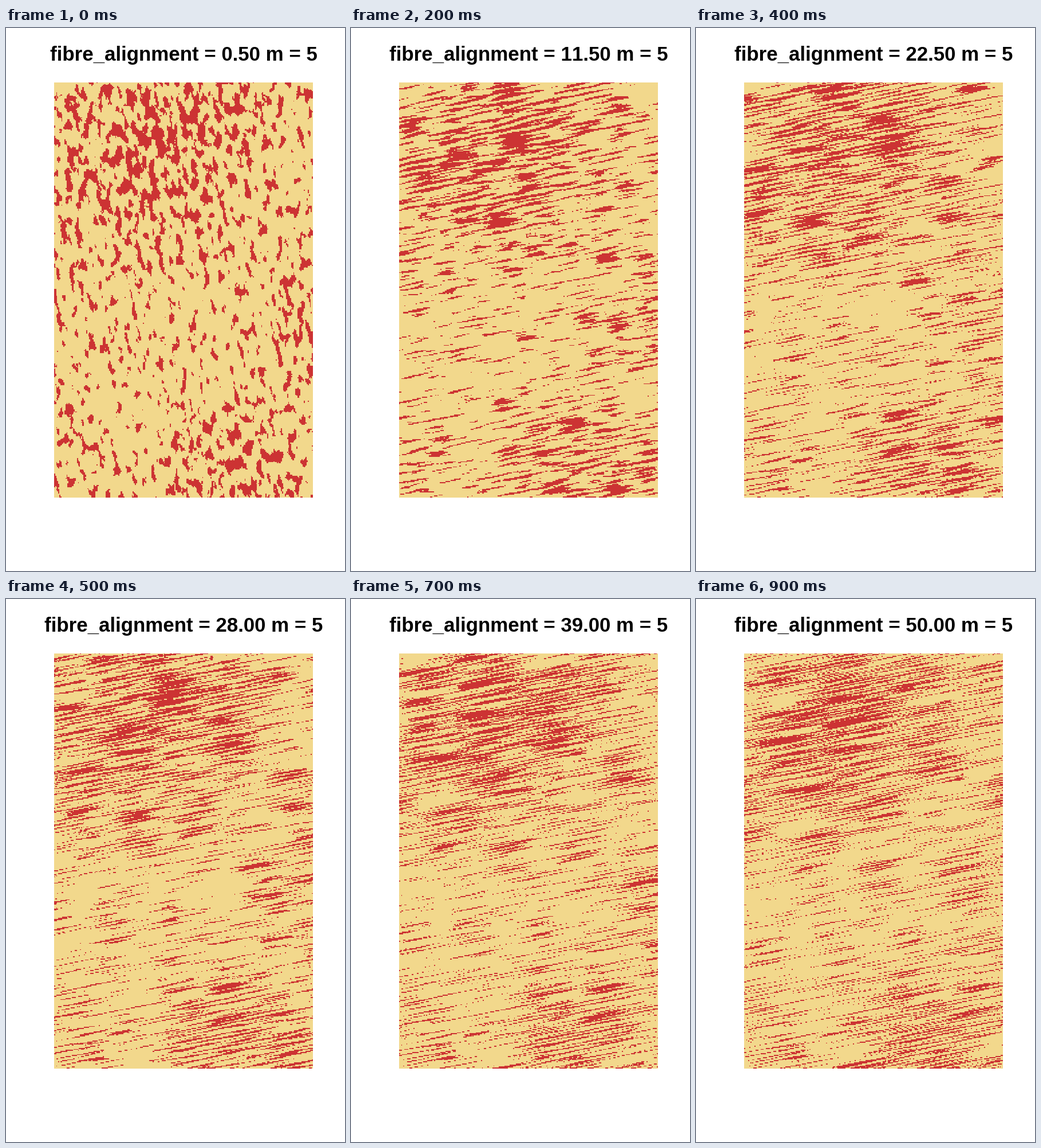
A matplotlib script for the animation above (1000 ms loop, 592x947 px).

```python
import numpy as np
import matplotlib
import matplotlib.pyplot as plt
from matplotlib.animation import FuncAnimation
from matplotlib.colors import ListedColormap

W, H, DPI = 592, 947, 100
LEFT, BOTTOM, WIDTH, HEIGHT = 84, 819, 452, 724
COLS, ROWS = 250, 400
FRAMES = 10

DENSITY = 0.22
FEATURE = 17.2          # noise lattice spacing in stage pixels
ROUGHNESS = 0.44
CLUMP_SPACING = 340     # mean distance of clumps across the fibres
ANGLE = np.radians(11)

# Dense regions: x, y, spread in x, spread in y, strength
PATCHES = [
    (290, 160, 120, 120, 1.1),
    (170, 290, 130, 90, 0.8),
    (510, 500, 70, 80, 0.6),
    (400, 775, 100, 70, 1.3),
    (100, 760, 60, 60, 0.4),
]

rng = np.random.RandomState(5)
PERM = np.tile(rng.permutation(256), 2)
GRAD = rng.rand(256) * 2 * np.pi
OFFSETS = rng.rand(4, 2) * 100
JITTER = rng.rand(256)


def lattice_hash(i, j):
    return PERM[PERM[i & 255] + (j & 255)]


def perlin(x, y):
    xi, yi = np.floor(x).astype(int), np.floor(y).astype(int)
    fx, fy = x - xi, y - yi

    def corner(i, j):
        angle = GRAD[lattice_hash(xi + i, yi + j)]
        return np.cos(angle) * (fx - i) + np.sin(angle) * (fy - j)

    def fade(t):
        return t ** 3 * (t * (6 * t - 15) + 10)

    wx, wy = fade(fx), fade(fy)
    low = corner(0, 0) * (1 - wx) + corner(1, 0) * wx
    high = corner(0, 1) * (1 - wx) + corner(1, 1) * wx
    return low * (1 - wy) + high * wy


def octaves(x, y, gain):
    total = sum(gain ** k * perlin(x * 2 ** k + ox, y * 2 ** k + oy)
                for k, (ox, oy) in enumerate(OFFSETS))
    return total / total.std()


def bump(dx, dy, sx, sy):
    return np.exp(-(dx / sx) ** 2 / 2 - (dy / sy) ** 2 / 2)


def clumps(u, v):
    """One clump of random place and strength in each tall lattice cell."""
    column = np.floor(u / FEATURE).astype(int)
    row = np.floor(v / CLUMP_SPACING).astype(int)
    key = lattice_hash(column, row)
    centre = (row + 0.25 + 0.5 * JITTER[key]) * CLUMP_SPACING
    strength = 1.8 * JITTER[PERM[key]]
    return strength * bump(u - (column + 0.42) * FEATURE, v - centre, 4, 30)


X, Y = np.meshgrid(LEFT + (np.arange(COLS) + 0.5) * WIDTH / COLS,
                   BOTTOM - HEIGHT + (np.arange(ROWS) + 0.5) * HEIGHT / ROWS)
ALONG = (X - LEFT) * np.cos(ANGLE) + (BOTTOM - Y) * np.sin(ANGLE)
ACROSS = (BOTTOM - Y) * np.cos(ANGLE) - (X - LEFT) * np.sin(ANGLE)
PATCH_FIELD = 0.15 * octaves(ALONG / 100, ACROSS / 100, 0.5)
for px, py, sx, sy, strength in PATCHES:
    PATCH_FIELD += strength * bump(X - px, Y - py, sx, sy)


def alignment(frame):
    return 0.5 + 5.5 * frame


def pattern(frame):
    """Noise stretched along the fibres, thresholded to a fixed density."""
    stretch = np.sqrt(alignment(frame))
    u, v = ALONG / stretch, ACROSS * stretch
    field = octaves(u / FEATURE, v / FEATURE, ROUGHNESS)
    field += PATCH_FIELD + clumps(u, v)
    return field > np.quantile(field, 1 - DENSITY)


matplotlib.rcParams["text.kerning_factor"] = 6
fig = plt.figure(figsize=(W / DPI, H / DPI), dpi=DPI, facecolor="white")
ax = fig.add_axes([LEFT / W, 1 - BOTTOM / H, WIDTH / W, HEIGHT / H])
ax.axis("off")
colours = ListedColormap([(0.95, 0.85, 0.55), (0.8, 0.2, 0.2)])
image = ax.imshow(np.zeros((ROWS, COLS)), cmap=colours, vmin=0, vmax=1,
                  interpolation="nearest", aspect="auto")
title = fig.text((LEFT + WIDTH / 2) / W, 1 - 57 / H, "", ha="center",
                 va="baseline", family="Liberation Sans", weight="bold",
                 size=34.9 * 72 / DPI, color="black")


def update(frame):
    image.set_data(pattern(frame).astype(float))
    title.set_text(f"fibre_alignment = {alignment(frame):.2f} m = 5")
    return image, title


animation = FuncAnimation(fig, update, frames=FRAMES, interval=100,
                          repeat=True, repeat_delay=0)
plt.show()
```
